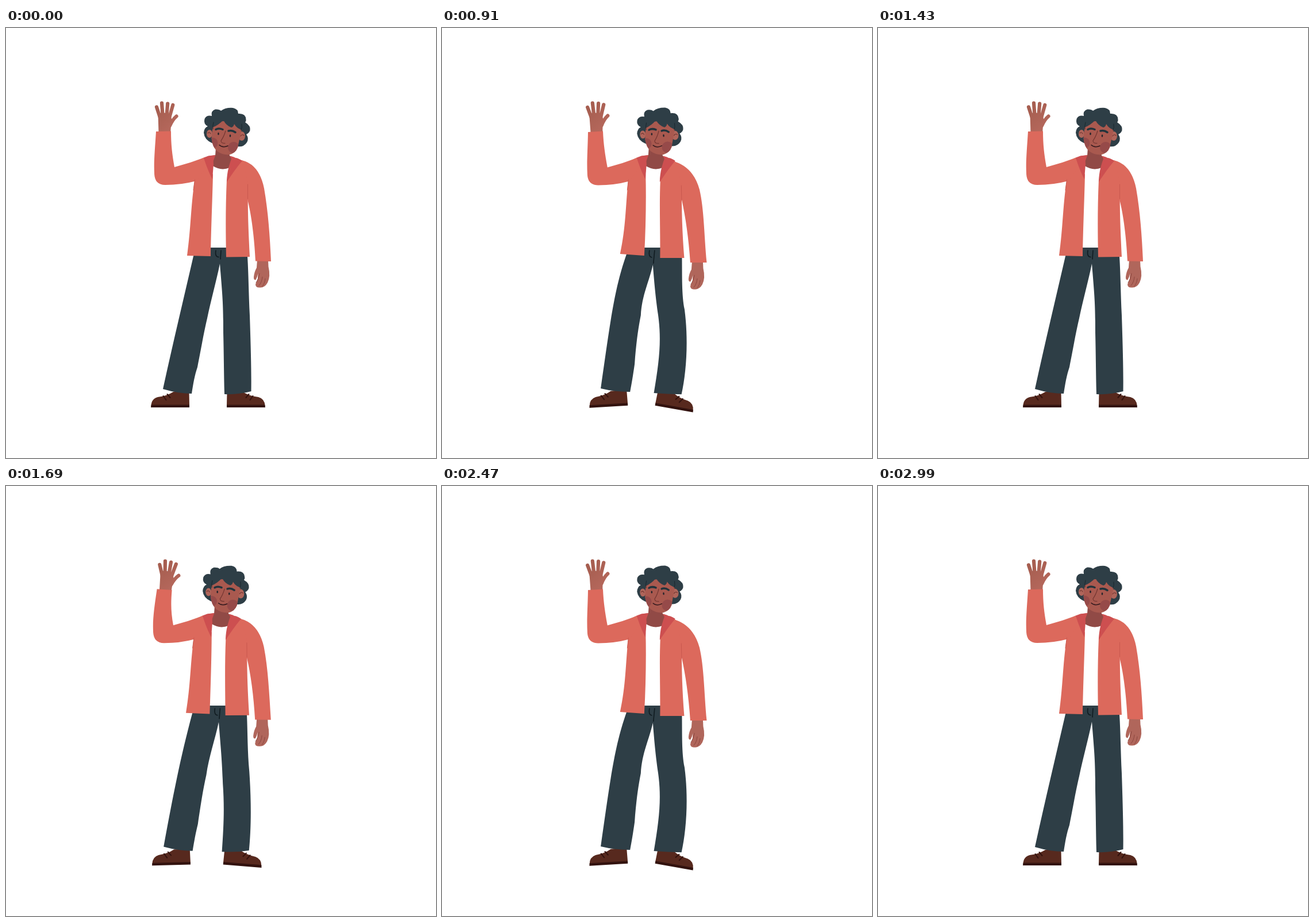
An HTML page that plays this animation: 748x748 px, repeating every 3120 ms.

```html
<!DOCTYPE html>
<html lang="en">
<head>
<meta charset="utf-8">
<title>Waving man</title>
<style>
  html, body { margin: 0; width: 100%; height: 100%; overflow: hidden; background: #fff; }
  svg { display: block; width: 100vw; height: 100vh; }
  .line { fill: none; stroke-linecap: round; stroke-linejoin: round; }
  .skin { fill: #a9594f; }
  .coat { fill: #dc695c; }
  .collar { fill: #cd4f50; }
  .hair, .pants { fill: #2e3e46; }
</style>
</head>
<body>
<svg viewBox="0 0 748 748">
  <defs>
    <linearGradient id="palm" gradientUnits="userSpaceOnUse" x1="262" y1="140" x2="290" y2="170">
      <stop offset="0" stop-color="#a65e50"/><stop offset="1" stop-color="#b4675b"/>
    </linearGradient>
    <path id="faceShape" d="M360 167L357.500 192Q359 207 367 214Q376 221 388 220.500Q399 218 403 208L411 172Q385 155 360 167Z"/>
    <clipPath id="faceClip"><use href="#faceShape"/></clipPath>
    <g id="shoe">
      <path fill="#57291e" d="M291 633L318.500 633L319 657H252.500Q253 645 264 642Q280 640 291 633Z"/>
      <path fill="#32120e" d="M252.500 655.500H319V660H252Z"/>
      <path class="line" stroke="#32120e" stroke-width="2" d="M273.500 640L278.500 647M280.500 637L285.500 643"/>
    </g>
  </defs>

  <g id="leftShoe"><use href="#shoe"/></g>
  <g id="rightShoe"><use href="#shoe" transform="matrix(-1 0 0 1 703 0)"/></g>
  <path id="pants" class="pants"/>
  <path id="fly" class="line" stroke="#101b20" stroke-width="1.600"/>

  <g id="rightHand">
    <path fill="#b0665b" d="M437 403H456L456.500 415Q460.500 432 455 443Q450 452 442 451.500Q434 452 434 446L438 436Q438 430 438.500 427Q437 434 434.500 438Q430.500 439 431 433Q432 424 436 417Z"/>
    <path class="line" stroke="#8b463f" stroke-width="1" d="M441 427Q440 436 435 443M446 433Q445 443 440 448M451 436Q450 445 446 449"/>
  </g>

  <g id="backCollar" class="collar"><path d="M350 223Q376 217 398 225L394 234L360 236Z"/></g>
  <g id="neck">
    <path fill="#914a46" d="M365 208L364 222L360 233L360 240Q374 249 389 243L394 231L389 222L388 212Z"/>
  </g>
  <path id="rightArm" class="coat"/>
  <path id="panels" class="coat"/>
  <g id="hand">
    <g class="line" stroke="url(#palm)" stroke-width="6.200">
      <path d="M262 137.500L269 159M271 130.500L273 158M281.200 131.500L279 158M290.300 134L283 160"/>
      <path d="M296.500 153.500Q290 159 285 170"/>
    </g>
    <path fill="url(#palm)" d="M264.500 149Q275 145 286.500 151L289 163Q286 172 286.500 183H265.500Z"/>
  </g>
  <path id="leftArm" class="coat"/>
  <path id="seams" class="line" stroke="#c9584f" stroke-width="1"/>
  <g id="collar" class="collar">
    <path d="M344 226Q351 221.500 360 222L361 237L359 263Q351 248 344 226Z"/>
    <path d="M393 225Q403 225 411 231Q399 245 384 268Q384 248 393 225Z"/>
  </g>

  <g id="head">
    <path class="hair" d="M358 200Q345 194 344 182Q345 173 351 171Q343 167 345.500 158Q349 151 358 153Q356 144 364 141.500Q371 141 374 144Q382 138 395 139Q404 141 404 149Q417 148 417.500 159Q418 162 416 164Q426 170 424.500 178Q423 183 418 185Q423 192 419 199Q413 208 402 206Z"/>
    <ellipse cx="354" cy="184" rx="5" ry="7" fill="#b0655a"/>
    <ellipse cx="410" cy="188" rx="6" ry="8" fill="#b0655a"/>
    <use href="#faceShape" class="skin"/>
    <g clip-path="url(#faceClip)" fill="#964a49">
      <circle cx="359" cy="200" r="9.500"/>
      <circle cx="396" cy="208" r="10"/>
    </g>
    <path class="hair" d="M351 171L358 158Q365 146 382 146Q408 148 416 164L413 178Q402 176 397 167Q396 172 392 173Q383 170 378 160Q370 169 359 173L358 178Q354 174 351 171Z"/>
    <g class="line">
      <path stroke="#6f332f" stroke-width="1.100" d="M382 179Q379 189 374 196Q374 201 381 200.500M351 183Q354 180 356 184M408 188Q411 184 414 187"/>
      <path stroke="#23343c" stroke-width="3.500" d="M365 176.500Q370 173.500 377 176.500M387 179Q393 177 399 181.500"/>
      <path stroke="#32191e" stroke-width="1.500" d="M371 203.500Q377 209 386 205"/>
      <path stroke="#152128" stroke-width=".8" d="M361 164Q359 171 360 176M410 167Q411 173 409 178"/>
    </g>
    <g fill="#25252b"><ellipse cx="369.500" cy="184" rx="1.300" ry="2.200"/><ellipse cx="390" cy="187.500" rx="1.300" ry="2.200"/></g>
  </g>
</svg>
<script>
const STEP = 130;
// Poses along one swing; the swing plays forward, then back.
const LEAN = [0, .4, .8, 1, 1.04, 1.05];
const FEET = [0, .4, .8, 1, .87, .8];
const WAVE = [0, 5, 10.5, 10.5, -2.5, -16];

// Each shape: upright, then leaning.
const SHAPES = {
  pants: [
    'M330 382L326 397C308 475 290 550 273 628Q300 636 323 636C326 617 328 605 333 590C341 550 343 535 350 505C356 475 366 440 372 410C377 470 378 480 378 530C379 570 379 600 380 637Q404 638 426.500 632C427 600 426 560 424 500C422 460 422 430 420 397L416 382Z',
    'M325 382L321 394C300 455 293 510 276 627Q300 633 327 633C330 617 332 605 335 585C338 545 342 520 346 500C348 465 361 440 367 412C370 450 372 470 376 500C382 545 378 580 369 635Q393 637 417 637C425 600 429 545 422 490C417 465 418 430 417.500 398L413 382Z'],
  fly: [
    'M374 387L373 402M365 387Q363 398 370 398.500',
    'M370 387L368 409M361 387Q359 398 365 399'],
  rightArm: [
    'M405 229Q440 234 449 279C456 320 459 360 461 406L434 405.500C432 365 427 325 420 298L405 260Z',
    'M400 231Q437 240 448 281C456 316 456 360 460.500 408L432 408C429 365 424 330 417 298L400 260Z'],
  panels: [
    'M345 225L360 255C359 300 357 340 356 397L315 396C322 345 321 315 328 266L330 232ZM400 229L412 231L421 270C420 320 422 355 424 398L383 398.500C382 350 382 310 384 264Z',
    'M340 225L354.500 255C355.500 300 354.500 350 352 396L310 393C320 345 319 315 324 266L325 232ZM395 230L407 233L417 272C417 320 418 355 421.500 400L379.500 400C380 350 378 310 380 264Z'],
  seams: [
    'M328.500 264L326 282M420.500 272L420.500 297',
    'M324.500 264L322.500 282M416.500 274L417 299']
};

const $ = id => document.getElementById(id);
const NUM = /\d+(\.\d+)?/g;

function blend([from, to], k) {
  const goal = to.match(NUM);
  let i = 0;
  return from.replace(NUM, n => (+n + (goal[i++] - n) * k).toFixed(2));
}

function place(id, dx, dy, angle = 0, cx = 0, cy = 0) {
  $(id).setAttribute('transform', `translate(${dx} ${dy}) rotate(${angle} ${cx} ${cy})`);
}

function turn(x, y, angle, cx, cy) {
  const a = angle * Math.PI / 180, c = Math.cos(a), s = Math.sin(a);
  return [cx + (x - cx) * c - (y - cy) * s, cy + (x - cx) * s + (y - cy) * c];
}

function drawWave(lean, angle) {
  const dx = -5 * lean;
  const [x, y] = turn(274, 180, angle * .55, 271, 255);
  place('hand', x - 274 + dx, y - 180, angle, 274, 180);
  const at = (px, py) => turn(px + x - 274, py + y - 180, angle, x, y).map(n => n.toFixed(2)).join(' ');
  place('leftArm', dx, .5 * lean);
  $('leftArm').setAttribute('d',
    `M${at(261, 180)}C${at(259, 212)} 257 232 258 252Q258 273 277 273Q305 273 331 266` +
    `L352 238L346 225Q320 235 293 242C289 220 ${at(287, 203)} ${at(287, 179.5)}Z`);
}

function draw(time) {
  const k = Math.floor(time / STEP) % 12;
  const i = k < 6 ? k : 11 - k;
  const lean = LEAN[i], feet = FEET[i];
  for (const id in SHAPES) $(id).setAttribute('d', blend(SHAPES[id], lean));
  place('leftShoe', 5 * feet, -1.5 * feet, -4 * feet, 285.5, 660);
  place('rightShoe', -16 * feet, 3 * feet, 11.5 * feet, 417.5, 660);
  place('rightHand', -2 * lean, 3 * lean);
  for (const id of ['backCollar', 'neck', 'collar']) place(id, -5 * lean, 0);
  place('head', -4 * lean, 0, -2.5 * lean, 384, 195);
  drawWave(lean, WAVE[i]);
}

const start = performance.now();
function frame() {
  draw(performance.now() - start);
  requestAnimationFrame(frame);
}
frame();
</script>
</body>
</html>
```
